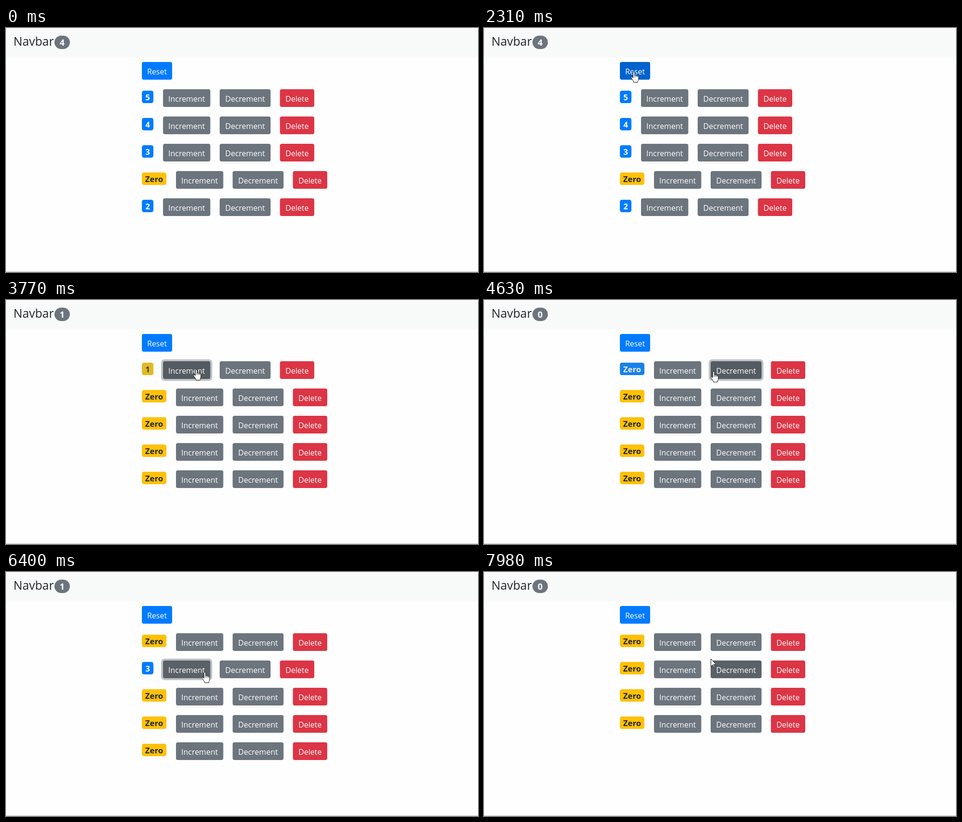
An HTML page that plays this animation: 983 px wide and 510 px high, repeating every 8000 ms.

```html
<!DOCTYPE html>
<html lang="en">
<head>
<meta charset="utf-8">
<title>Counters</title>
<style>
  html, body { margin: 0; width: 100%; height: 100%; overflow: hidden; background: #fefefe; }
  svg { display: block; width: 983px; height: 510px; }
  text { font: 16px "Open Sans", "Noto Sans", sans-serif; text-anchor: middle; }
  .badge { font-size: 16.8px; font-weight: 700; }
  .total { font-size: 18px; font-weight: 700; }
  .brand { font-size: 24.8px; text-anchor: start; }
</style>
</head>
<body>
<svg id="stage" viewBox="0 0 983 510"></svg>
<script>
const LOOP = 8000, TICK = 77, FADE = 150, CLICK = 125;
const ENTRY = [990, 550];

// what the user does: press a button (action, row id) and/or move the pointer
const SCRIPT = [
  { start: 420, end: 1200, to: [497, 212], slow: true },
  { start: 1280, end: 1890, to: [312, 91] },
  { start: 2310, end: 2620, press: ['reset', ''] },
  { start: 2920, end: 3240, to: [396, 145] },
  { start: 3620, end: 4400, press: ['inc', 0], to: [478, 149] },
  { start: 4480, end: 5090, press: ['dec', 0], to: [423, 205] },
  { start: 5240, end: 5560, press: ['inc', 1] },
  { start: 5710, end: 5710, to: [414, 209] },
  { start: 5860, end: 6095, press: ['inc', 1] },
  { start: 6170, end: 6480, press: ['inc', 1] },
  { start: 6630, end: 6705, to: [450, 224] },
  { start: 6780, end: 6930, to: [641, 225] },
  { start: 7120, end: 7340, to: [610, 209] },
  { start: 7510, end: 7980, press: ['del', 1], to: [472, 181] }
];
const PRESSES = SCRIPT.filter(s => s.press);

// base, hover, active, focus ring
const BLUE = ['#007bff', '#0069d9', '#0062cc', '#268fff'];
const GREY = ['#6c757d', '#5a6268', '#545b62', '#828a91'];
const RED = ['#dc3545', '#c82333', '#bd2130', '#e15361'];

const clamp = v => Math.min(1, Math.max(0, v));
const smooth = v => (v = clamp(v), v * v * (3 - 2 * v));
const lerp = (a, b, k) => a + (b - a) * k;

function mix(a, b, k) {
  const part = (c, i) => parseInt(c.slice(i, i + 2), 16);
  return `rgb(${[1, 3, 5].map(i => Math.round(lerp(part(a, i), part(b, i), k)))})`;
}

// the screen refreshes in even ticks while something happens, then rests
function snap(t) {
  const step = SCRIPT.filter(s => s.start <= t).pop();
  if (!step) return 0;
  const { start, end } = step;
  const count = Math.round((end - start) / TICK) || 1;
  const i = Math.floor((t - start + 8) / ((end - start) / count || TICK));
  return start + (end - start) * Math.min(1, i / count);
}

function pointer(t) {
  if (t < SCRIPT[0].start) return null;
  let at = ENTRY;
  for (const { start, end, press, to, slow } of SCRIPT) {
    if (!to) continue;
    const leave = start + (press ? 2 * TICK : -TICK);
    const k = clamp((t - leave) / (end - leave));
    const eased = slow ? k * (2 - k) : k;
    at = at.map((v, i) => lerp(v, to[i], eased));
  }
  return at;
}

function rowsAt(t) {
  let rows = [5, 4, 3, 0, 2].map((n, id) => ({ n, id, turned: -FADE }));
  const set = (row, n, at) => {
    if (!row.n !== !n) row.turned = at;
    row.n = n;
  };
  for (const { start, press: [action, id] } of PRESSES) {
    const up = start + CLICK;
    if (up > t) break;
    if (action === 'reset') rows.forEach(r => set(r, 0, up));
    else if (action === 'del') rows = rows.filter(r => r.id !== id);
    else {
      const row = rows.find(r => r.id === id);
      set(row, row.n + (action === 'inc' ? 1 : -1), up);
    }
  }
  return rows;
}

function buttonsAt(rows) {
  const list = [{ key: 'reset', label: 'Reset', x: 283, y: 71, w: 63, tone: BLUE }];
  rows.forEach(({ n, id }, i) => {
    const y = 128 + 57 * i, shift = n ? 0 : 27;
    const add = (name, label, x, w, tone) =>
      list.push({ key: name + id, label, x: x + shift, y, w, tone });
    add('inc', 'Increment', 327, 98.5, GREY);
    add('dec', 'Decrement', 445, 106, GREY);
    add('del', 'Delete', 570.5, 71.5, RED);
  });
  return list;
}

function hit(t) {
  const p = pointer(t);
  const b = p && buttonsAt(rowsAt(t)).find(b =>
    p[0] >= b.x && p[0] < b.x + b.w && p[1] >= b.y && p[1] < b.y + 37);
  return b ? b.key : '';
}

// how strongly a button is focused and whether it is held down
function pressState(key, t) {
  const past = PRESSES.filter(s => s.start <= t);
  const last = past.pop(), before = past.pop();
  if (!last) return [0, false];
  const now = last.press.join('') === key;
  const was = !!before && before.press.join('') === key;
  const focus = lerp(+was, +now, clamp((t - last.start) / FADE));
  return [focus, now && t < last.start + CLICK + TICK / 2];
}

const rect = (x, y, w, h, r, fill, more = '') =>
  `<rect x="${x}" y="${y}" width="${w}" height="${h}" rx="${r}" fill="${fill}" ${more}/>`;
const text = (x, y, s, fill, cls = '') =>
  `<text x="${x}" y="${y}" fill="${fill}" class="${cls}">${s}</text>`;

function drawButton(b, t, hover) {
  const [focus, held] = pressState(b.key, t);
  const [base, dark, active, ring] = b.tone;
  const fill = held ? active : mix(base, dark, hover === b.key ? 1 : focus);
  const glow = focus ? rect(b.x - 4, b.y - 4, b.w + 8, 45, 7, ring, `opacity="${focus / 2}"`) : '';
  return glow + rect(b.x, b.y, b.w, 37, 4, fill) + text(b.x + b.w / 2, b.y + 26, b.label, '#fff');
}

function drawBadge(row, i, t) {
  const k = smooth((t - row.turned) / FADE);
  const zero = row.n ? 1 - k : k;
  const y = 131 + 57 * i, w = row.n ? 24 : 51;
  return rect(283, y, w, 26, 4.5, mix('#007bff', '#ffc107', zero)) +
    text(283 + w / 2, y + 20, row.n || 'Zero', mix('#ffffff', '#212529', zero), 'badge');
}

const ARROW = 'M.5.5v16l3.7-3.5 2.4 5.6 2.2-.9-2.4-5.5h5z';
const HAND = 'M-1.6 13V2a1.75 1.75 0 0 1 3.5 0V8a1.6 1.6 0 0 1 3 .4a1.6 1.6 0 0 1 2.8 .7' +
  'a1.5 1.5 0 0 1 2.3 1.1V15c0 3-1.8 4-1.8 7.5H-.2C-.4 19-3.4 17-5.2 13.5c-1-2 1-3 2-2z' +
  'M1.9 8v3.5M4.9 8.4v3M7.7 9.1v2.5';

function drawPointer(t) {
  const p = pointer(t);
  if (!p) return '';
  return `<path transform="translate(${p.map(Math.round)})" d="${hit(t) ? HAND : ARROW}"
    fill="#fff" stroke="#111" stroke-linejoin="round"/>`;
}

const stage = document.getElementById('stage');

function draw(t) {
  const rows = rowsAt(t), hover = hit(t - TICK); // hover colour trails the pointer
  stage.innerHTML =
    rect(0, 0, 983, 510, 0, '#fefefe') +
    rect(0, 0, 983, 61, 0, '#f8faf9') +
    rect(0, 509, 983, 1, 0, '#bfbfbf') +
    text(15.5, 37, 'Navbar', '#212529', 'brand') +
    rect(101, 16, 32, 28, 14, '#6c757d') +
    text(117, 37, rows.filter(r => r.n).length, '#fff', 'total') +
    rows.map((r, i) => drawBadge(r, i, t)).join('') +
    buttonsAt(rows).map(b => drawButton(b, t, hover)).join('') +
    drawPointer(t);
}

const begin = performance.now();
let shown = -1;
function tick() {
  const t = snap((performance.now() - begin) % LOOP);
  if (t !== shown) draw(shown = t);
  requestAnimationFrame(tick);
}
tick();
</script>
</body>
</html>
```
